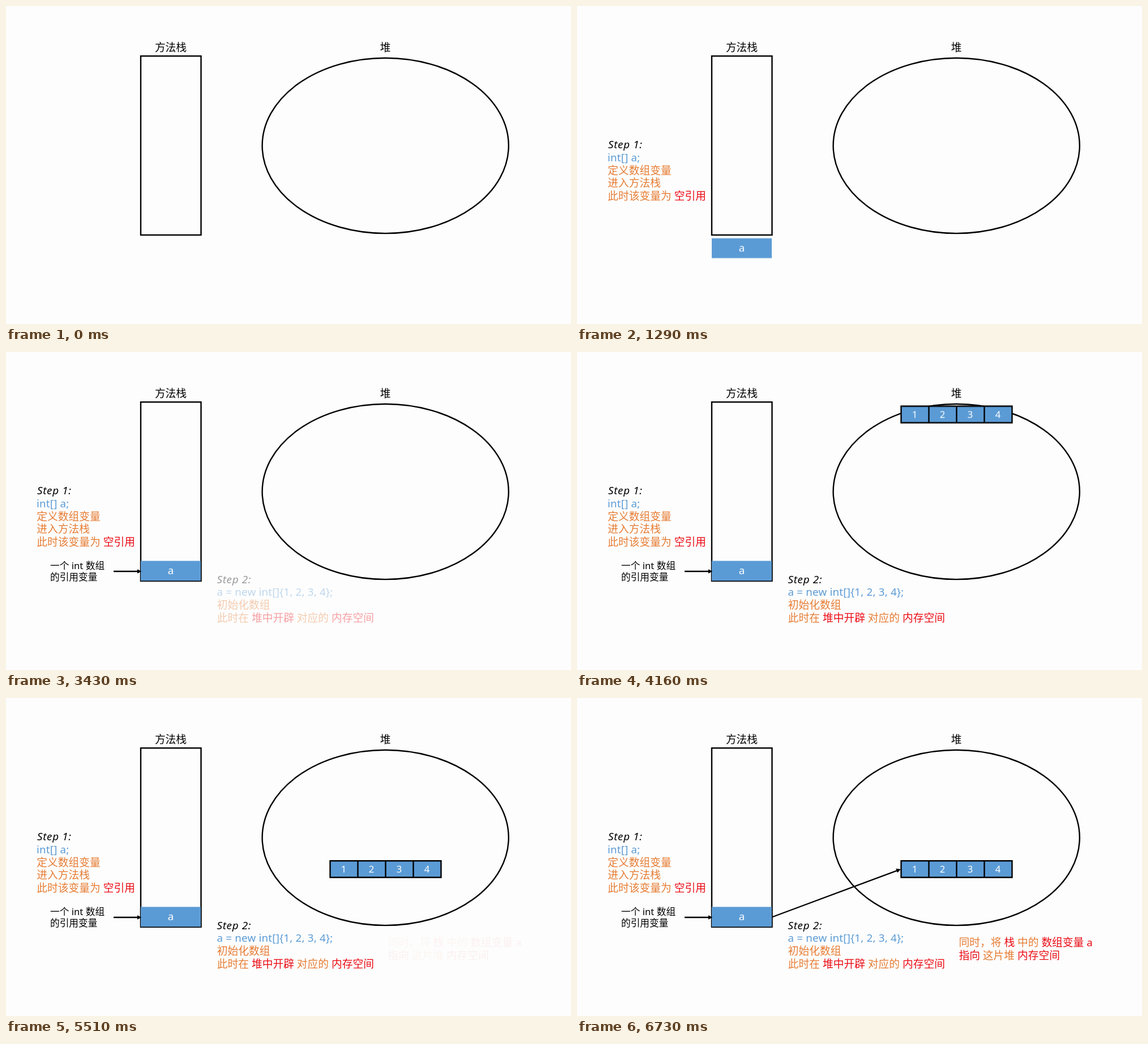
Write an HTML page that moves like this. It is 998 by 561 pixels and loops after 6760 ms.

```html
<!DOCTYPE html>
<html lang="zh-CN">
<head>
<meta charset="utf-8">
<title>数组内存示意</title>
<style>
html, body { margin: 0; width: 100%; height: 100%; overflow: hidden; background: #fdfdfd; }
svg { display: block; width: 100%; height: 100%; }
text { font: 18.75px "Noto Sans", "Noto Sans CJK SC", sans-serif; white-space: pre; }
.line { fill: none; stroke: #000; stroke-width: 2.4; }
.mid { text-anchor: middle; }
.small { font-size: 16.7px; }
.step { font-style: italic; letter-spacing: .7px; }
.code { fill: #5b9bd5; letter-spacing: .2px; }
.note { fill: #e67c33; }
.key { fill: #ea0b14; }
.white { fill: #fff; }
.cell { fill: #5b9bd5; }

/* one loop for everything; 1% = 67.6 ms */
.anim { animation: 6.76s linear infinite; }
.fade1 { animation-name: fade1; }
.push { animation-name: push; }
.slide { animation-name: slide; }
.fade2 { animation-name: fade2; }
.drop { animation-name: drop; }
.fade3 { animation-name: fade3; }
.wipe { animation-name: wipe; }
@keyframes fade1 { 0% { opacity: 0 } 7.4%, 100% { opacity: 1 } }
@keyframes push {
  0%, 7.47% { transform: translateY(193px) }
  22.26%, 100% { transform: translateY(0) }
}
@keyframes slide {
  0%, 22.23% { transform: translateX(var(--from)) }
  37.03%, 100% { transform: translateX(0) }
}
@keyframes fade2 { 0%, 47.9% { opacity: 0 } 55.3%, 100% { opacity: 1 } }
@keyframes drop {
  0%, 55.68% { transform: translateY(-318px) }
  70.47%, 100% { transform: translateY(0) }
}
@keyframes fade3 { 0%, 81.14% { opacity: 0 } 88.54%, 100% { opacity: 1 } }
@keyframes wipe {
  0%, 88.54% { transform: translateX(0) }
  99.56%, 100% { transform: translateX(274px) }
}
</style>
</head>
<body>
<svg viewBox="0 0 998 561">
  <defs>
    <marker id="head" viewBox="0 0 8 8" refX="8" refY="4" markerWidth="8" markerHeight="8"
            markerUnits="userSpaceOnUse" orient="auto"><path d="M0 0L8 4L0 8z"/></marker>
    <linearGradient id="edge" gradientUnits="userSpaceOnUse" x1="300" x2="344" y1="0" y2="0">
      <stop stop-color="#fff"/><stop offset="1" stop-color="#000"/>
    </linearGradient>
    <mask id="reveal" maskUnits="userSpaceOnUse" x="0" y="0" width="998" height="561">
      <rect class="anim wipe" width="344" height="561" fill="url(#edge)"/>
    </mask>
  </defs>

  <text class="mid" x="291" y="80">方法栈</text>
  <rect class="line" x="238" y="88.3" width="106.5" height="315.7"/>
  <text class="mid" x="670" y="80">堆</text>
  <ellipse class="line" cx="670.2" cy="246.4" rx="217.6" ry="154.7"/>

  <g class="anim fade1">
    <text class="step" x="55" y="251.3">Step 1:</text>
    <text class="code" x="54" y="273.8">int[] a;</text>
    <g class="note">
      <text x="54.3" y="296.8">定义数组变量</text>
      <text x="54.3" y="319.2">进入方法栈</text>
      <text x="54.3" y="341.6">此时该变量为 <tspan class="key">空引用</tspan></text>
    </g>
  </g>

  <g class="anim push">
    <rect class="cell" x="238" y="368.5" width="106" height="35"/>
    <text class="white mid" x="291" y="392.3">a</text>
  </g>

  <g class="anim slide" style="--from:-183px">
    <text class="small" x="78" y="383.3">一个 int 数组</text>
    <text class="small" x="78" y="403">的引用变量</text>
  </g>
  <g class="anim slide" style="--from:-239.5px">
    <path class="line" d="M190 387H234"/>
    <path class="line" d="M190 387H239.5" stroke-opacity="0" marker-end="url(#head)"/>
  </g>

  <g class="anim fade2">
    <text class="step" x="372.5" y="408">Step 2:</text>
    <text class="code" x="372.5" y="430.4">a = new int[]{1, 2, 3, 4};</text>
    <g class="note">
      <text x="372.8" y="453.3">初始化数组</text>
      <text x="372.8" y="475.6">此时在 <tspan class="key">堆中开辟</tspan> 对应的 <tspan class="key">内存空间</tspan></text>
    </g>
  </g>

  <g class="anim drop">
    <rect class="cell" x="572.5" y="287.2" width="196" height="29.3"/>
    <path class="line" d="M572.5 287.2H768.5V316.5H572.5zM621.5 287.2V316.5M670.5 287.2V316.5M719.5 287.2V316.5"/>
    <g class="white mid">
      <text class="small" x="596.5" y="307.6">1</text>
      <text class="small" x="645.5" y="307.6">2</text>
      <text class="small" x="694.5" y="307.6">3</text>
      <text class="small" x="743.5" y="307.6">4</text>
    </g>
  </g>

  <g class="anim fade3 note">
    <text x="674.5" y="438">同时，将 <tspan class="key">栈</tspan> 中的 <tspan class="key">数组变量 a</tspan></text>
    <text x="674.5" y="460.5"><tspan class="key">指向</tspan> 这片堆 <tspan class="key">内存空间</tspan></text>
  </g>

  <g mask="url(#reveal)">
    <path class="line" d="M344.5 386.5L567 303.9"/>
    <path class="line" d="M344.5 386.5L572 302" stroke-opacity="0" marker-end="url(#head)"/>
  </g>
</svg>
</body>
</html>
```
